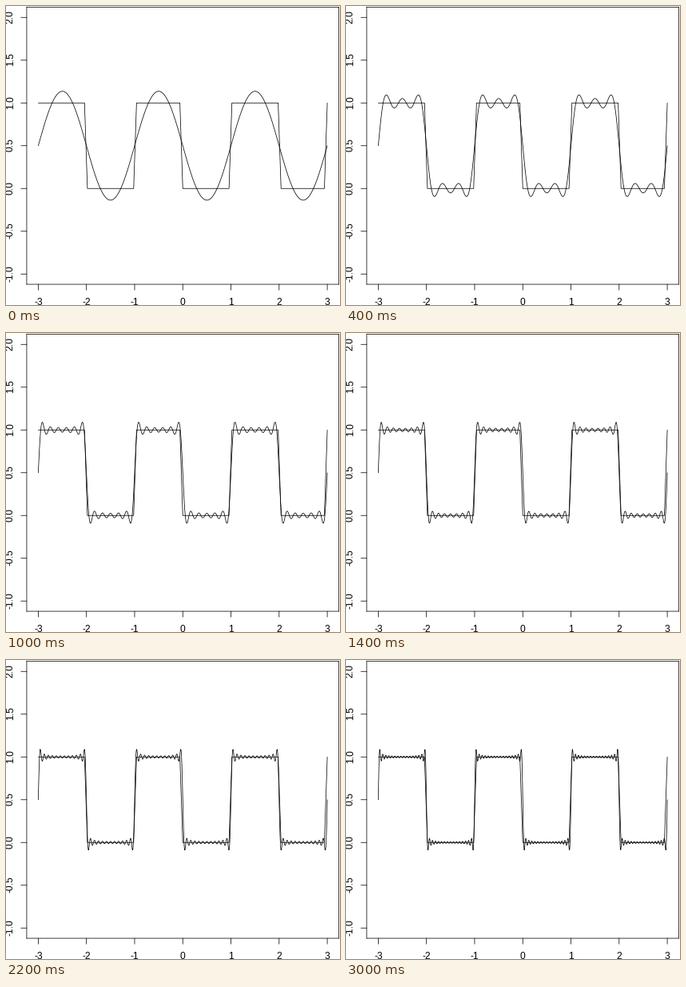
Recreate the animation shown at these times as a matplotlib script. Size 418 px wide and 374 px high, loop 3.2 s.

```python
import numpy as np
import matplotlib.pyplot as plt
from matplotlib.animation import FuncAnimation
from matplotlib.transforms import blended_transform_factory

W, H, DPI = 418, 374, 64
PX = 72 / DPI  # points per pixel
LEFT, RIGHT, TOP, BOTTOM = 25.92, 416.56, 1.44, 348.08
TICK = 7.2
TERMS = 16

plt.rcParams["font.family"] = "Liberation Sans"
plt.rcParams["path.simplify"] = False
plt.rcParams["path.snap"] = False

fig = plt.figure(figsize=(W / DPI, H / DPI), dpi=DPI, facecolor="white")
ax = fig.add_axes([LEFT / W, 1 - BOTTOM / H, (RIGHT - LEFT) / W, (BOTTOM - TOP) / H])
ax.set(xlim=(-3.24, 3.24), ylim=(-1.12, 2.12), xticks=[], yticks=[], autoscale_on=False)

style = dict(color="black", lw=0.75 * PX, solid_capstyle="round", solid_joinstyle="round")
for spine in ax.spines.values():
    spine.set_linewidth(style["lw"])

# Ticks and labels: one coordinate in data units, the other in stage fractions.
below = blended_transform_factory(ax.transData, fig.transFigure)
beside = blended_transform_factory(fig.transFigure, ax.transData)
label = dict(ha="center", va="baseline", rotation_mode="anchor", fontsize=12 * PX)
raised = beside + plt.matplotlib.transforms.Affine2D().translate(0, 1)
axis_y = 1 - BOTTOM / H
for t in range(-3, 4):
    ax.plot([t, t], [axis_y, axis_y - TICK / H], transform=below, clip_on=False, **style)
    ax.text(t, 0, f"{t}", transform=below, **label)
for t in np.arange(-1, 2.1, 0.5):
    ax.plot([LEFT / W, (LEFT - TICK) / W], [t, t], transform=beside, clip_on=False, **style)
    ax.text(8.64 / W, t, f"{t:.1f}", transform=raised, rotation=90, **label)

# The square wave is sampled coarsely, which gives its slanted edges.
xs = np.round(np.linspace(-3, 3, 101), 6)
x = np.linspace(-3, 3, 1001)
ax.plot(xs, np.floor(xs) % 2, **style)
wave, = ax.plot([], [], **style)


def partial_sum(n):
    odd = 2 * np.arange(n)[:, None] + 1
    return 0.5 - 2 / np.pi * np.sum(np.sin(odd * np.pi * x) / odd, axis=0)


def update(i):
    wave.set_data(x, partial_sum(i + 1))
    return wave,


anim = FuncAnimation(fig, update, frames=TERMS, interval=200, repeat=True, repeat_delay=0)
plt.show()
```
